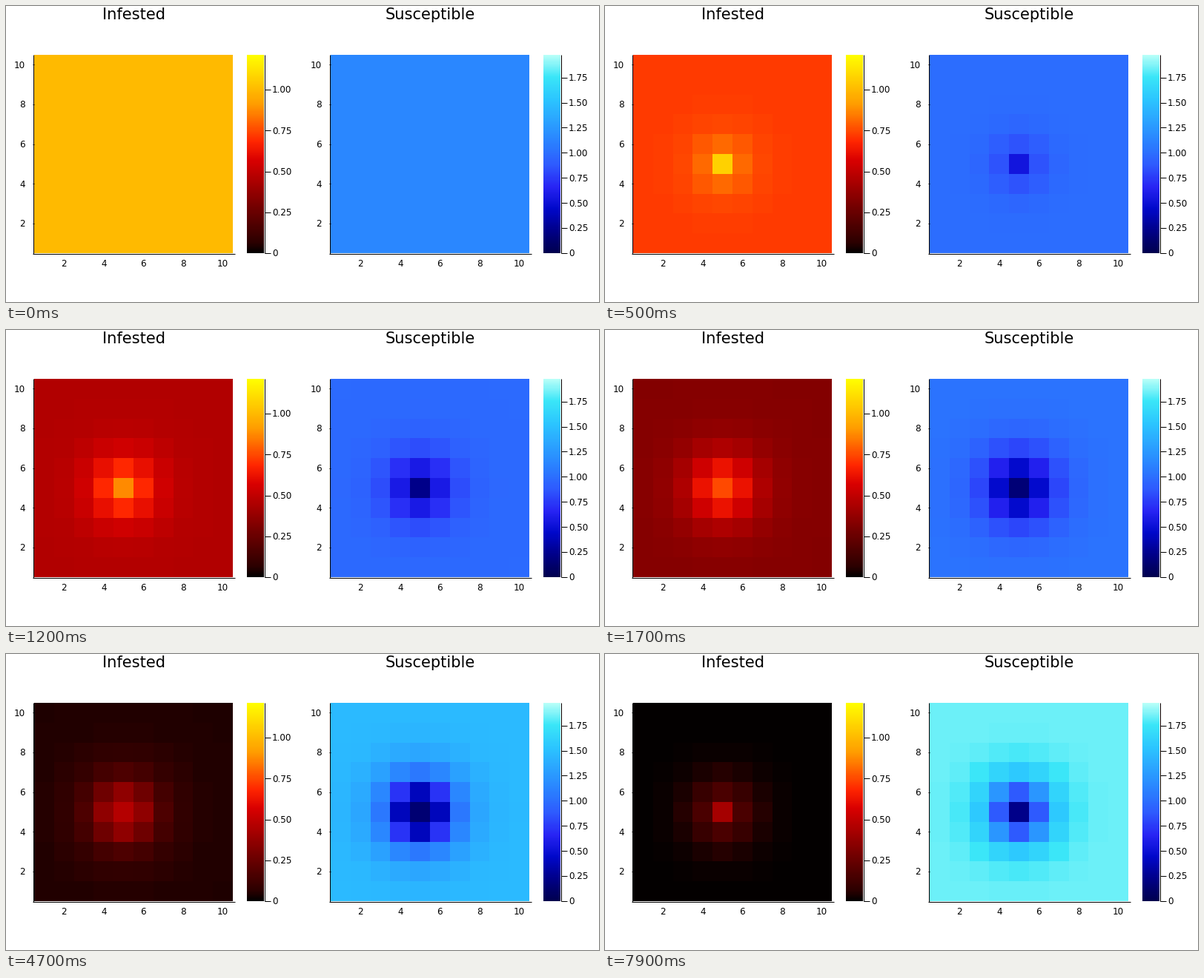
A matplotlib script for the animation above (8000 ms loop, 800x400 px).

```python
import numpy as np
import matplotlib.pyplot as plt
from matplotlib.animation import FuncAnimation
from matplotlib.colors import LinearSegmentedColormap

W, H, DPI = 800, 400, 100
FRAMES, STEP_MS = 80, 100
PX = 72 / DPI
TOP, BOTTOM = 66, 334
CELL = (BOTTOM - TOP) / 10

HEAT = LinearSegmentedColormap.from_list("heat", [
    (0, "#000000"), (.05, "#2b0000"), (.25, "#7b0000"), (.468, "#d90000"),
    (.563, "#ff2600"), (.75, "#ff9c00"), (1, "#ffff00")])
BLUES = LinearSegmentedColormap.from_list("blues", [
    "#00004e", "#000088", "#0008ca", "#2824f4", "#2f5afe",
    "#2a80ff", "#2ba3ff", "#2cc6ff", "#3ae6f8", "#b9fff8"])

axis = np.arange(1, 11)
DIST = np.hypot(axis - 5, axis[:, None] - 5)


def pulse(t, decay):
    return t ** 1.4 * np.exp(-decay * t)


def bump(t, peak, ring):
    """Offset from the surroundings: peak at the centre, ring one cell away."""
    d = DIST - 1
    fall = .45 + 1.1 * np.exp(-t) + .08 * t
    return np.where(DIST == 0, peak, ring * np.exp(-fall * d - .12 * d * d))


def infested(t):
    peak = .42 * (1 - np.exp(-3.6 * t))
    return np.exp(-.65 * t) + bump(t, peak, .3 * pulse(t, .45))


def susceptible(t):
    far = .995 + .108 * t + (.155 - .48 * t) * np.exp(-.85 * t)
    centre = .09 + 1.06 * np.exp(-1.7 * t) + .0022 * t * t
    return far - bump(t, far - centre, .415 * pulse(t, .26))


plt.rcParams["font.family"] = "DejaVu Sans"
fig = plt.figure(figsize=(W / DPI, H / DPI), dpi=DPI, facecolor="white")
ax = fig.add_axes([0, 0, 1, 1])


def line(xs, ys):
    ax.plot(xs, ys, color="black", lw=PX, solid_capstyle="butt")


def label(x, y, s, ha, size=12):
    ax.text(x, y, s, ha=ha, va="baseline", fontsize=size * PX, color="black")


def panel(x, title, cmap, vmax, field):
    def image(data, left, right):
        return ax.imshow(data, cmap=cmap, vmin=0, vmax=vmax, origin="lower",
                         extent=(x + left, x + right, BOTTOM, TOP),
                         aspect="auto", interpolation="nearest")

    heat = image(field(0), 38, 306)
    image(np.linspace(0, vmax, 256)[:, None], 325, 348)

    line([x + 36.5] * 2, [TOP, BOTTOM + 1])
    line([x + 36, x + 309], [BOTTOM + .5] * 2)
    for n in range(2, 11, 2):
        cy = BOTTOM - (n - .5) * CELL
        line([x + 36, x + 38], [cy] * 2)
        label(x + 25.7, cy + 4.4, str(n), "right")
        label(x + 38 + (n - .5) * CELL, 352.3, str(n), "center")

    line([x + 348.5] * 2, [TOP, BOTTOM])
    for v in np.arange(0, vmax, .25):
        cy = BOTTOM - v / vmax * (BOTTOM - TOP)
        line([x + 349, x + 357], [cy] * 2)
        label(x + 359, cy + 4.4, f"{v:.2f}" if v else "0", "left")

    label(x + 172, 18.3, title, "center", 21)
    return heat, field


panels = [panel(0, "Infested", HEAT, 1.213, infested),
          panel(400, "Susceptible", BLUES, 1.976, susceptible)]
ax.set_xlim(0, W)
ax.set_ylim(H, 0)
ax.axis("off")


def draw(frame):
    for heat, field in panels:
        heat.set_data(field(frame * STEP_MS / 1000))
    return [heat for heat, _ in panels]


anim = FuncAnimation(fig, draw, frames=FRAMES, interval=STEP_MS,
                     repeat=True, repeat_delay=0, blit=False)
plt.show()
```
